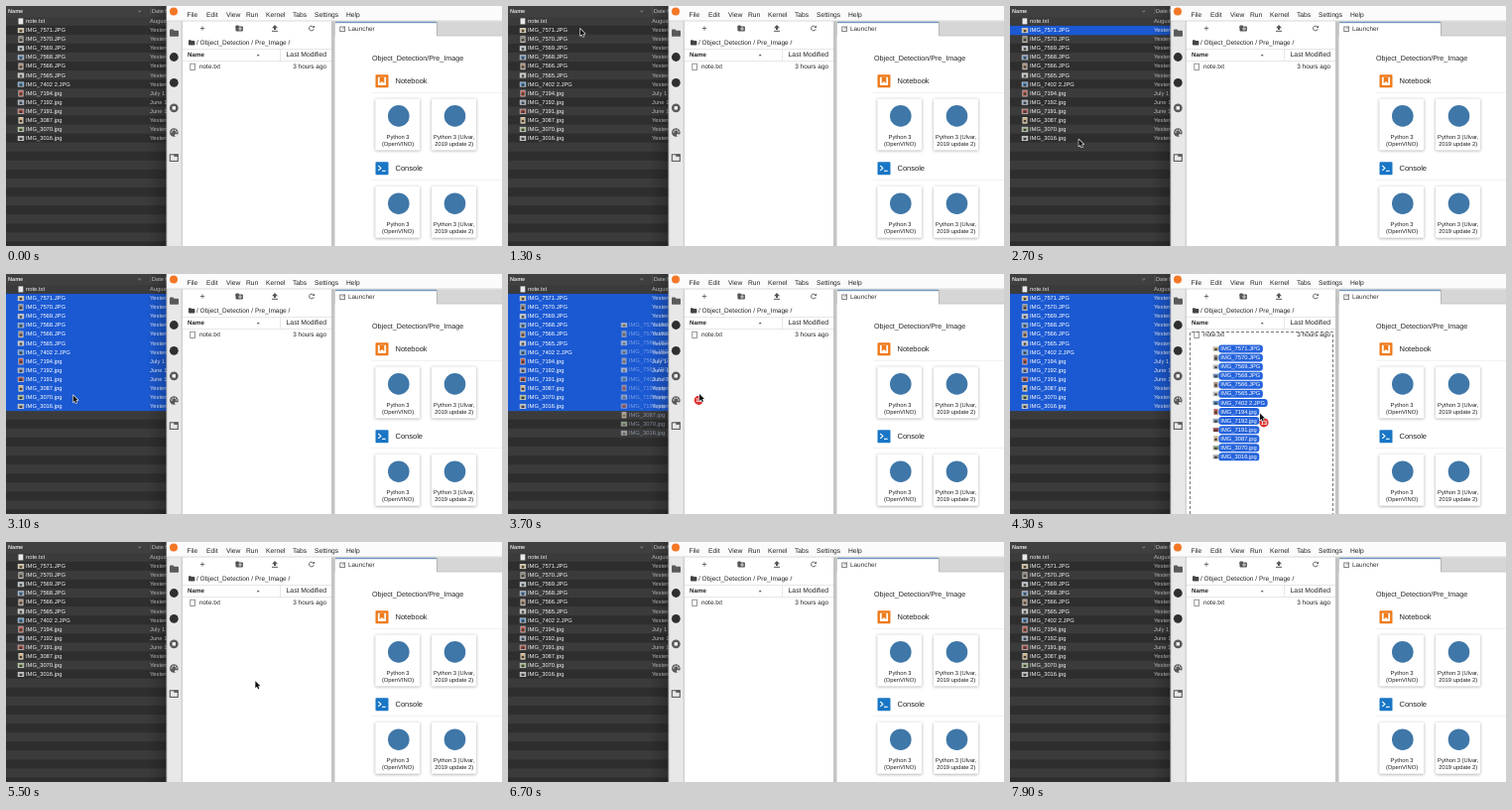
Write an HTML page with a canvas that moves like this. It is 500 px wide and 242 px high and loops after 8 s.

```html
<!DOCTYPE html>
<html lang="en">
<head>
<meta charset="utf-8">
<title>Dragging files into the notebook</title>
<style>
html, body { margin: 0; width: 100%; height: 100%; overflow: hidden; background: #fff; }
canvas { display: block; width: 500px; height: 242px; }
</style>
</head>
<body>
<canvas id="stage"></canvas>
<script>
const W = 500, H = 242, LOOP = 8000, ROW = 9.07;
const FONT = '"Liberation Sans", Arial, sans-serif';
const BLUE = '#1b59d2';
const canvas = document.getElementById('stage');
const dpr = window.devicePixelRatio || 1;
canvas.width = W * dpr;
canvas.height = H * dpr;
const c = canvas.getContext('2d');
c.scale(dpr, dpr);
c.textRendering = 'geometricPrecision';
c.textBaseline = 'middle';

const files = ['7571.JPG', '7570.JPG', '7569.JPG', '7568.JPG', '7566.JPG', '7565.JPG', '7402 2.JPG',
  '7194.jpg', '7192.jpg', '7191.jpg', '3087.jpg', '3070.jpg', '3016.jpg'].map(n => 'IMG_' + n);
const dates = { 7: 'July 1', 8: 'June 1', 9: 'June 1' };
const tones = ['#c9b58d', '#8d8577', '#b8bec4', '#6f93b8', '#a98f78', '#c4c4bd', '#5b8fc0',
  '#b5574d', '#8c9bb0', '#a04b45', '#d0b489', '#8da37a', '#a3a3a3'];

// Motion as [time, x, y]
const pointerPath = [[900, 118, 62], [1300, 72.7, 23], [1900, 72.7, 23], [2700, 69.3, 134.5],
  [2900, 69.3, 134.5], [3300, 66, 110], [3700, 193, 121], [4100, 252, 140.5], [6500, 251, 140]];
const dragPath = [[3300, 15, 24], [3700, 117, 51.5], [4100, 207.5, 75.5]];
const PICK_ONE = 1700, PICK_ALL = 2900, DRAG = 3500, OVER = 3900, DROP = 4500, CLEAR = 4700;

function along(path, t) {
  if (t <= path[0][0]) return path[0].slice(1);
  for (let i = 1; i < path.length; i++) {
    const [t0, x0, y0] = path[i - 1], [t1, x1, y1] = path[i];
    if (t <= t1) {
      const u = (t - t0) / (t1 - t0), k = u * u * (3 - 2 * u);
      return [x0 + (x1 - x0) * k, y0 + (y1 - y0) * k];
    }
  }
  return path[path.length - 1].slice(1);
}

function box(x, y, w, h, fill) {
  c.fillStyle = fill;
  c.fillRect(x, y, w, h);
}

function round(x, y, w, h, r, fill) {
  c.fillStyle = fill;
  c.beginPath();
  c.roundRect(x, y, w, h, r);
  c.fill();
}

function disc(x, y, r, fill) {
  c.fillStyle = fill;
  c.beginPath();
  c.arc(x, y, r, 0, 7);
  c.fill();
}

function text(s, x, y, size, fill, align = 'left', weight = 'normal') {
  c.font = `${weight} ${size}px ${FONT}`;
  c.textAlign = align;
  c.fillStyle = fill;
  c.fillText(s, x, y);
}

function line(points, stroke, width = 1) {
  c.strokeStyle = stroke;
  c.lineWidth = width;
  c.beginPath();
  points.forEach(([x, y], i) => i ? c.lineTo(x, y) : c.moveTo(x, y));
  c.stroke();
}

function shape(points, fill) {
  c.fillStyle = fill;
  c.beginPath();
  points.forEach(([x, y]) => c.lineTo(x, y));
  c.closePath();
  c.fill();
}

function folder(x, y, w, h, fill) {
  round(x, y, w * 0.45, h * 0.5, 0.8, fill);
  round(x, y + h * 0.17, w, h * 0.83, 0.8, fill);
}

function thumb(i, x, y) {
  const tall = i % 3 === 1, w = tall ? 5 : 6.4, h = tall ? 6.6 : 5;
  box(x - w / 2, y - h / 2, w, h, '#dcdcdc');
  box(x - w / 2 + 0.6, y - h / 2 + 0.6, w - 1.2, h - 1.2, tones[i]);
  box(x - 1.2, y - 0.4, 2.4, 2, '#3a3835');
}

function finder(t) {
  box(0, 0, 162, H, '#2e2e2e');
  for (let i = 0; i < 26; i += 2) box(0, 10.7 + i * ROW, 162, ROW, '#3b3b3b');
  box(0, 0, 162, 9.8, '#404040');
  box(0, 9.8, 162, 0.7, '#505050');
  text('Name', 2, 5.3, 5.6, '#e0e0e0', 'left', 'bold');
  line([[133.2, 4.6], [134.7, 5.9], [136.2, 4.6]], '#aaa', 0.7);
  box(145, 1, 0.7, 8, '#595959');
  text('Date M', 147, 5.3, 5.6, '#d8d8d8');

  const picked = t >= PICK_ALL && t < CLEAR ? files.length : t >= PICK_ONE && t < PICK_ALL ? 1 : 0;
  if (picked) box(0, 19.9, 162, ROW * picked + 0.3, BLUE);

  box(12.5, 12.4, 4.8, 6, '#e9e9e9');
  text('note.txt', 20, 15.8, 5.8, '#f0f0f0');
  text('August', 145, 15.8, 5.8, '#c4c4c4');
  files.forEach((name, i) => {
    const y = 24.6 + i * ROW, on = i < picked;
    thumb(i, 15, y);
    text(name, 20, y, 5.8, on ? '#fff' : '#f0f0f0');
    text(dates[i] || 'Yesterday', 145, y, 5.8, on ? '#e6edfc' : '#c4c4c4');
  });

  const shade = c.createLinearGradient(142, 0, 162, 0);
  shade.addColorStop(0, 'rgba(0,0,0,0)');
  shade.addColorStop(1, 'rgba(0,0,0,.22)');
  box(142, 0, 20, H, shade);
}

function sidebar() {
  const ink = '#5a5a5a';
  box(162, 15, 15, H, '#e8e8e8');
  box(161.5, 0, 0.9, H, '#b0b0b0');
  box(176.8, 15, 0.9, H, '#bcbcbc');
  folder(165, 23.5, 9, 7.2, ink);
  disc(169.3, 51.5, 4.4, '#2f2f2f');
  disc(169.3, 77.3, 4.4, '#2f2f2f');
  disc(169.3, 102.8, 4.4, ink);
  box(167.6, 101.1, 3.4, 3.4, '#f4f4f4');
  disc(169.3, 127.5, 4.3, ink);
  for (const [x, y] of [[167, 127], [168.3, 125.2], [170.5, 125.2], [171.8, 127]]) disc(x, y, 0.75, '#eee');
  disc(171.5, 130.3, 1.4, '#e8e8e8');
  c.strokeStyle = ink;
  c.lineWidth = 1.1;
  c.strokeRect(165.3, 149.8, 8, 6.6);
  box(169.3, 149.5, 4, 2.4, ink);
}

function menu() {
  box(162, 0, 338, 15, '#fbfbfb');
  disc(169, 5.5, 4, '#f37726');
  const items = { File: 182.5, Edit: 202, View: 222, Run: 242, Kernel: 262, Tabs: 289, Settings: 311, Help: 343 };
  for (const name in items) text(name, items[name], 8.8, 6.7, '#222');
  box(162, 14.6, 338, 0.8, '#cfcfcf');
}

function browser(over) {
  const ink = '#555';
  line([[195.8, 22.5], [200.2, 22.5]], ink, 0.8);
  line([[198, 20.3], [198, 24.7]], ink, 0.8);
  folder(231.5, 19.5, 7.4, 6, ink);
  line([[234, 23], [238, 23]], '#fff', 0.7);
  line([[236, 21], [236, 25]], '#fff', 0.7);
  shape([[271, 19], [274, 22.3], [272, 22.3], [272, 24], [270, 24], [270, 22.3], [268, 22.3]], ink);
  box(268, 24.8, 6, 1, ink);
  c.strokeStyle = ink;
  c.lineWidth = 0.9;
  c.beginPath();
  c.arc(308, 22.5, 2.4, 0.3, 5.4);
  c.stroke();
  shape([[308.7, 21.9], [311, 21.9], [311, 19.6]], ink);

  folder(184, 34.2, 6.4, 5.4, '#444');
  text('/ Object_Detection / Pre_Image /', 192, 37, 6.5, '#222');
  box(178, 43.2, 150, 0.7, '#ddd');
  box(178, 55, 150, 0.7, '#ddd');
  text('Name', 183, 49.3, 6.2, '#222', 'left', 'bold');
  shape([[252.6, 50.2], [254.2, 48.5], [255.8, 50.2]], '#555');
  box(276, 43.5, 0.7, 12, '#ddd');
  text('Last Modified', 323, 49.3, 6.8, '#222', 'right');
  c.strokeStyle = '#777';
  c.lineWidth = 0.8;
  c.strokeRect(185.8, 58.2, 4.6, 6.2);
  text('note.txt', 195, 61.5, 6.4, '#222');
  text('3 hours ago', 323, 61.5, 6.4, '#222', 'right');

  if (over) {
    c.setLineDash([3, 2]);
    line([[181.5, H], [181.5, 58.5], [325.5, 58.5], [325.5, H]], '#777', 1);
    c.setLineDash([]);
  }
}

function card(x, y, lines) {
  c.save();
  c.shadowColor = 'rgba(0,0,0,.35)';
  c.shadowBlur = 3 * dpr;
  c.shadowOffsetY = 0.7 * dpr;
  round(x, y, 45, 52, 1.2, '#fff');
  c.restore();
  disc(x + 23.5, y + 17.5, 10.8, '#3f77a8');
  lines.forEach((s, i) => text(s, x + 22.7, y + 39 + i * 6.8, 5.8, '#222', 'center'));
}

function section(y, name) {
  text(name, 392.5, y, 7.5, '#222');
  box(368, y + 11, 132, 0.6, '#e9e9e9');
  card(372.3, y + 17.4, ['Python 3', '(OpenVINO)']);
  card(429, y + 17.4, ['Python 3 (Ulvar,', '2019 update 2)']);
}

function launcher() {
  box(328, 15.4, 172, 14.6, '#d6d6d6');
  box(328, 15.4, 3.5, H, '#c4c4c4');
  box(332, 16, 102, 14.5, '#fff');
  box(332, 15.6, 102, 1.6, '#6f97bf');
  box(434, 16, 0.8, 14, '#b0b0b0');
  box(434, 29.6, 66, 0.8, '#bdbdbd');
  c.strokeStyle = '#666';
  c.lineWidth = 0.8;
  c.strokeRect(336.8, 21, 4.6, 4.6);
  line([[339, 23.4], [341.8, 20.6]], '#666', 0.8);
  text('Launcher', 345, 23.5, 6.4, '#333');
  text('Object_Detection/Pre_Image', 369, 53.5, 7.2, '#222');

  section(76, 'Notebook');
  round(372.5, 69.3, 13, 13, 0.8, '#ef7a1a');
  box(374.9, 71.7, 8.2, 8.2, '#fff');
  shape([[376.7, 71.7], [381.3, 71.7], [381.3, 78], [379, 76], [376.7, 78]], '#ef7a1a');

  section(164.3, 'Console');
  round(372.5, 157.3, 13, 13, 0.8, '#1976c5');
  line([[375.3, 161], [377.9, 163.4], [375.3, 165.8]], '#fff', 1.1);
  line([[379, 166.3], [382.7, 166.3]], '#fff', 1.1);
}

function dragged(t) {
  const [x, y] = along(dragPath, t), solid = t >= OVER;
  c.globalAlpha = t < 3700 ? 0.3 : solid ? 1 : 0.55;
  files.forEach((name, i) => {
    const ry = y + i * ROW;
    thumb(i, x, ry);
    if (solid) {
      c.font = `5.8px ${FONT}`;
      round(x + 2.8, ry - 4, c.measureText(name).width + 4.6, 8, 3.2, '#2563dc');
    }
    text(name, x + 4.8, ry, 5.8, solid ? '#fff' : '#c5d3ee');
  });
  c.globalAlpha = 1;
}

function pointer(x, y) {
  c.save();
  c.translate(x, y);
  c.beginPath();
  for (const p of [[0, 0], [0, 7], [1.6, 5.6], [2.7, 8], [3.9, 7.5], [2.8, 5.1], [5, 5]]) c.lineTo(...p);
  c.closePath();
  c.lineJoin = 'round';
  c.strokeStyle = '#f2f2f2';
  c.lineWidth = 1.2;
  c.stroke();
  c.fillStyle = '#111';
  c.fill();
  c.restore();
}

function badge(x, y) {
  disc(x, y, 4.6, '#dc3030');
  text('13', x, y + 0.3, 5.6, '#fff', 'center', 'bold');
}

function draw(t) {
  const dragging = t >= DRAG && t < DROP;
  finder(t);
  box(162, 0, 338, H, '#fff');
  sidebar();
  browser(t >= OVER && t < DROP);
  launcher();
  menu();
  if (dragging) dragged(t);
  if (t >= 900 && t < 6500) {
    const [x, y] = along(pointerPath, t);
    if (dragging) badge(t < OVER ? x - 0.7 : x + 4, t < OVER ? y + 6.3 : y + 9.3);
    pointer(x, y);
  }
}

function tick(now) {
  const t = now % LOOP;
  draw(t < 100 ? 0 : 100 + Math.floor((t - 100) / 200) * 200);
  requestAnimationFrame(tick);
}
draw(0);
requestAnimationFrame(tick);
</script>
</body>
</html>
```
